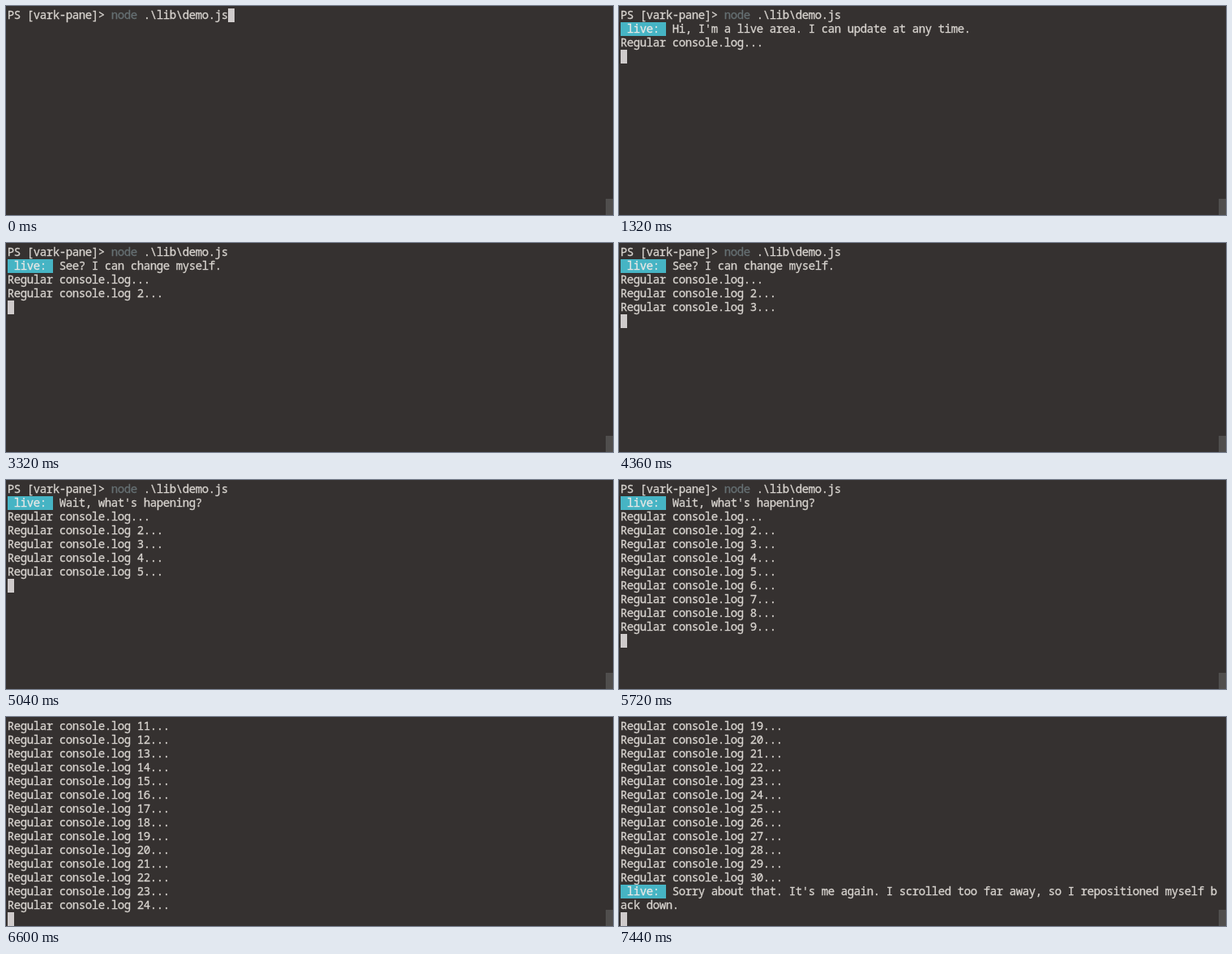
Animation of 749 by 258 pixels, one loop 8000 ms. Source, as an HTML page with a canvas:

```html
<!DOCTYPE html>
<html lang="en">
<head>
<meta charset="utf-8">
<title>Live terminal line</title>
<style>
  html, body { margin: 0; width: 100%; height: 100%; overflow: hidden; background: #353130; }
  canvas { display: block; }
</style>
</head>
<body>
<canvas width="749" height="258"></canvas>
<script>
const ctx = document.querySelector('canvas').getContext('2d', { alpha: false });
const LOOP = 8000;
const COLS = 92, ROWS = 15, CELL_W = 8, CELL_H = 17, LEFT = 2, TOP = 3, BASELINE = 13;
const BG = '#353130', FG = '#d8d4cf', DIM = '#667073';
const CYAN = '#46b4c4', WHITE = '#e8e8e6', CURSOR = '#cfcbcb', THUMB = '#504e4d';

const PROMPT = [['PS [vark-pane]> ', FG], ['node', DIM], [' .\\lib\\demo.js', FG]];
const LOG_TIMES = [1320, 3320, 4360, 4800, 5040, 5280, 5520, 5640, 5720];
const MOVE_TIME = 7440;

// Slow logs come one by one, then a burst every 50 ms shown at 80 ms refreshes.
function logCount(t) {
  if (t < 5880) return LOG_TIMES.filter(at => at <= t).length;
  const start = t < 6720 ? 5880 : 6720;
  const shown = start + 80 * Math.floor((t - start) / 80);
  return Math.min(30, 13 + Math.floor((shown - 6015) / 50));
}

function liveText(t) {
  if (t < 2320) return "Hi, I'm a live area. I can update at any time.";
  if (t < 4800) return 'See? I can change myself.';
  return "Wait, what's hapening?";
}

const liveLine = text => [[' live: ', WHITE, CYAN], [' ' + text, FG]];

function buildLines(t) {
  const lines = [PROMPT];
  if (t < 280) return lines;
  lines.push(liveLine(liveText(t)));
  for (let i = 1; i <= logCount(t); i++) {
    lines.push([[`Regular console.log${i > 1 ? ' ' + i : ''}...`, FG]]);
  }
  if (t >= MOVE_TIME) {
    const text = "Sorry about that. It's me again. I scrolled too far away, so I repositioned myself back down.";
    const room = COLS - 8;
    lines.push(liveLine(text.slice(0, room)), [[text.slice(room), FG]]);
  }
  return lines;
}

function fillCells(col, row, count, color) {
  ctx.fillStyle = color;
  ctx.fillRect(LEFT + col * CELL_W, TOP + row * CELL_H, count * CELL_W, CELL_H);
}

function drawLine(line, row) {
  const y = TOP + row * CELL_H + BASELINE;
  let col = 0;
  for (const [text, color, back] of line) {
    if (back) fillCells(col, row, text.length, back);
    ctx.fillStyle = ctx.strokeStyle = color;
    for (const ch of text) {
      const x = LEFT + (col + 0.5) * CELL_W;
      ctx.fillText(ch, x, y);
      ctx.strokeText(ch, x, y);
      col++;
    }
  }
  return col;
}

function draw(t) {
  ctx.fillStyle = BG;
  ctx.fillRect(0, 0, 749, 258);
  ctx.fillStyle = THUMB;
  ctx.fillRect(740, 238, 9, 20);
  ctx.font = '14px "Noto Sans Mono", "DejaVu Sans Mono", monospace';
  ctx.textAlign = 'center';
  ctx.lineWidth = 0.3; // slightly heavier strokes

  const lines = buildLines(t);
  const visible = lines.slice(Math.max(0, lines.length + 1 - ROWS));
  let endCol = 0;
  visible.forEach((line, row) => { endCol = drawLine(line, row); });

  if (t < 40) fillCells(endCol, 0, 1, CURSOR);
  else fillCells(0, visible.length, 1, CURSOR);
}

const begin = performance.now();
function tick() {
  draw((performance.now() - begin) % LOOP);
  requestAnimationFrame(tick);
}
tick();
</script>
</body>
</html>
```
